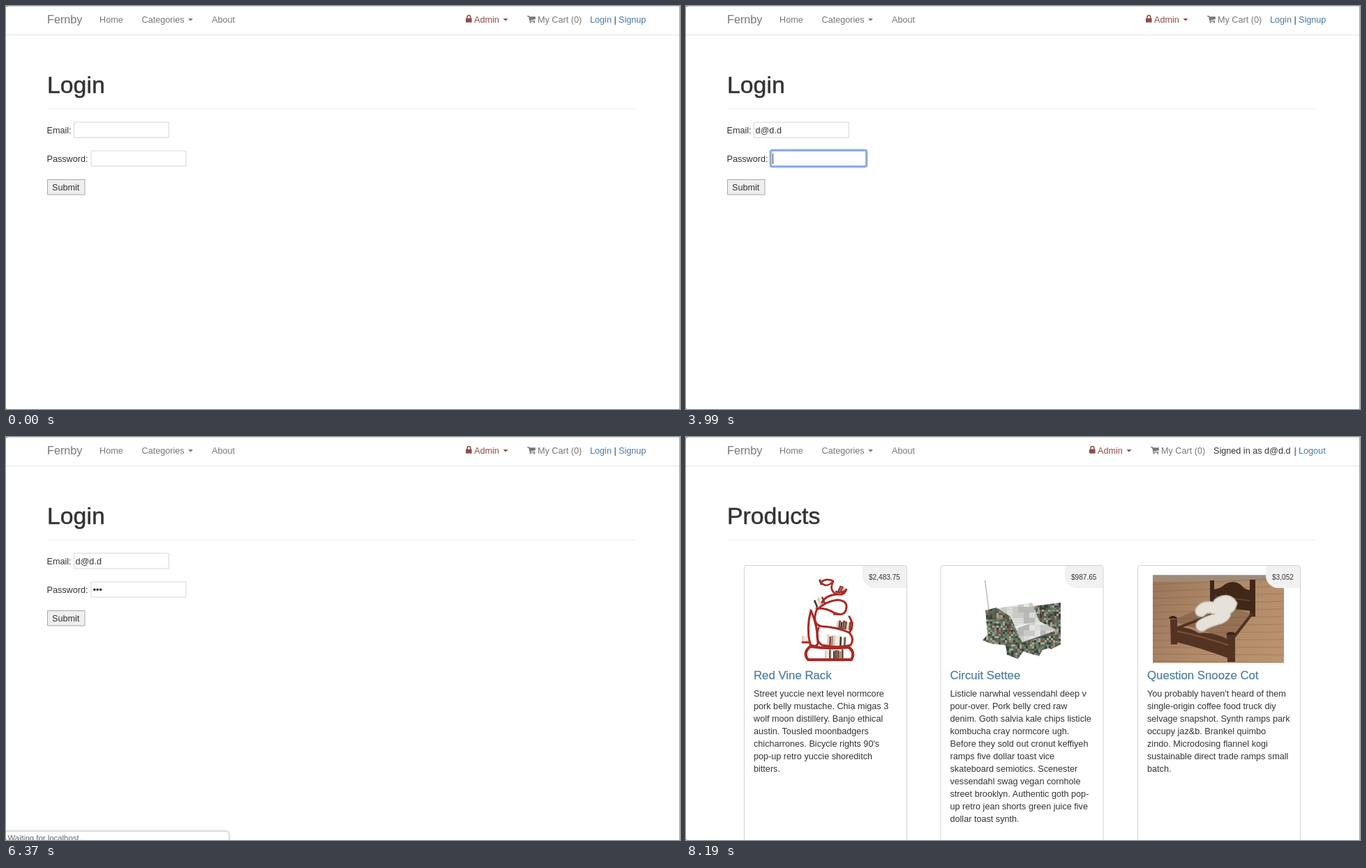
An HTML page with a canvas for the animation above (8.33 s loop, 966 by 579 pixels).

```html
<!DOCTYPE html>
<html lang="en">
<head>
<meta charset="utf-8">
<title>Shop login</title>
<style>
html, body { margin: 0; width: 100%; height: 100%; overflow: hidden; background: #fff; }
canvas, svg { position: absolute; left: 0; top: 0; width: 966px; height: 579px; }
text { font: 12.65px "Liberation Sans", Arial, sans-serif; fill: #333; white-space: pre; }
.nav { fill: #777; }
.brand { font-size: 16.2px; fill: #777; }
.danger { fill: #8f4b49; }
.link { fill: #4a7a9f; }
.h1 { font-size: 33.8px; stroke: #333; stroke-width: .5px; }
.title { font-size: 16.8px; fill: #4f7f9f; stroke: #4f7f9f; stroke-width: .25px; }
.title.hover { fill: #37566d; stroke: #37566d; text-decoration: underline; }
.price { font-size: 10.1px; }
.status { font-size: 11.4px; fill: #666; }
</style>
</head>
<body>
<canvas id="stage" width="966" height="579"></canvas>
<svg id="words" viewBox="0 0 966 579"></svg>
<script>
const LOOP = 8330;
const g = document.getElementById('stage').getContext('2d');
const words = document.getElementById('words');

// Times in ms
const FOCUS_EMAIL = 1470, EMAIL_TYPED = 1960, FOCUS_PASS = 2450, KEYS = [4340, 4620, 4760];
const PRESS = 6020, RELEASE = 6160, WAIT = 6370, SHOP = 6580, LOADED = 6860;
const CARD_ON = 6930, TITLE_ON = 7210, TITLE_OFF = 7420, CARD_OFF = 7840;
const CARET_X = [124, 129, 133, 138];

const cards = [
  { x: 83, tag: 253, price: '$2,483.75', title: 'Red Vine Rack', art: drawShelf, lines: [
    'Street yuccie next level normcore', 'pork belly mustache. Chia migas 3',
    'wolf moon distillery. Banjo ethical', 'austin. Tousled moonbadgers',
    "chicharrones. Bicycle rights 90's", 'pop-up retro yuccie shoreditch', 'bitters.'] },
  { x: 364.5, tag: 543, price: '$987.65', title: 'Circuit Settee', art: drawChair, lines: [
    'Listicle narwhal vessendahl deep v', 'pour-over. Pork belly cred raw',
    'denim. Goth salvia kale chips listicle', 'kombucha cray normcore ugh.',
    'Before they sold out cronut keffiyeh', 'ramps five dollar toast vice',
    'skateboard semiotics. Scenester', 'vessendahl swag vegan cornhole',
    'street brooklyn. Authentic goth pop-', 'up retro jean shorts green juice five',
    'dollar toast synth.'] },
  { x: 647, tag: 831, price: '$3,052', title: 'Question Snooze Cot', art: drawBed, lines: [
    "You probably haven't heard of them", 'single-origin coffee food truck diy',
    'selvage snapshot. Synth ramps park', 'occupy jaz&amp;b. Brankel quimbo',
    'zindo. Microdosing flannel kogi', 'sustainable direct trade ramps small', 'batch.'] }
];

const label = (x, y, str, cls = '') => `<text x="${x}" y="${y}" class="${cls}">${str}</text>`;
const group = (id, ...parts) => `<g id="${id}">${parts.join('')}</g>`;

words.innerHTML = [
  label(59, 24.5, 'Fernby', 'brand'), label(134, 23.5, 'Home', 'nav'),
  label(194.5, 23.5, 'Categories', 'nav'), label(295, 23.5, 'About', 'nav'),
  group('login',
    label(671, 23.5, 'Admin', 'danger'), label(762, 23.5, 'My Cart (0)', 'nav'),
    label(837, 23.5, 'Login', 'link'), label(871.5, 23.5, '|'), label(878, 23.5, 'Signup', 'link'),
    label(59, 125, 'Login', 'h1'), label(58.5, 182.5, 'Email:'),
    label(58.5, 223.5, 'Password:'), label(66, 264.5, 'Submit')),
  group('email', label(99.5, 182.5, 'd@d.d')),
  group('shop',
    label(590, 23.5, 'Admin', 'danger'), label(681, 23.5, 'My Cart (0)', 'nav'),
    label(756, 23.5, 'Signed in as d@d.d'), label(871.5, 23.5, '|'), label(878, 23.5, 'Logout', 'link'),
    label(59, 125, 'Products', 'h1'),
    ...cards.flatMap(c => [
      label(c.tag + 9, 205, c.price, 'price'),
      label(c.x + 14, 348, c.title, 'title'),
      ...c.lines.map((line, i) => label(c.x + 14, 373 + 18 * i, line))
    ])),
  group('status', label(2.5, 580, 'Waiting for localhost...', 'status'))
].join('');

const firstTitle = words.querySelector('.title');
const show = (id, on) => { document.getElementById(id).style.display = on ? '' : 'none'; };

function rect(x, y, w, h, color) {
  g.fillStyle = color;
  g.fillRect(x, y, w, h);
}
function frame(x, y, w, h, color, radius = 0, width = 1) {
  g.strokeStyle = color;
  g.lineWidth = width;
  g.beginPath();
  g.roundRect(x, y, w, h, radius);
  g.stroke();
}
function fill(path, color) {
  g.fillStyle = color;
  g.fill(new Path2D(path));
}
function line(path, color, width) {
  g.strokeStyle = color;
  g.lineWidth = width;
  g.stroke(new Path2D(path));
}
function random(seed) {
  return () => (seed = seed * 16807 % 2147483647) / 2147483647;
}

function arrow(x, color) {
  fill(`M${x} 18h7l-3.5 3.6z`, color);
}
function lock(x) {
  line(`M${x + 2} 18v-2a2.4 2.4 0 0 1 4.8 0v2`, '#8f4b49', 1.5);
  rect(x, 17.6, 8.6, 6, '#8f4b49');
}
function cart(x) {
  line(`M${x} 14.7h2.4l1.8 7h7`, '#777', 1.2);
  fill(`M${x + 2.6} 15.3h9.2v4l-8.2 1.1z`, '#777');
  rect(x + 3.6, 22.4, 2, 2, '#777');
  rect(x + 9, 22.4, 2, 2, '#777');
}

function books(x, y, n, h, tilt, rnd) {
  const tones = ['#6b4a3c', '#d8cdbd', '#3f3733', '#a5897a', '#efe9df', '#8a3a31'];
  g.save();
  g.translate(x, y);
  g.rotate(tilt);
  for (let i = 0; i < n; i++) {
    const tall = h * (.75 + .25 * rnd());
    rect(i * 3, -tall, 2.6, tall, tones[Math.floor(rnd() * tones.length)]);
  }
  g.restore();
}

function drawShelf() {
  const rnd = random(41), red = '#a92b25';
  g.lineCap = g.lineJoin = 'round';
  books(193, 213, 2, 11, -.35, rnd);
  books(217, 222, 4, 10, .4, rnd);
  books(187, 245, 5, 14, -.4, rnd);
  books(211, 256, 4, 5, .1, rnd);
  books(215, 275, 8, 13, .12, rnd);
  books(202, 299, 9, 16, .05, rnd);
  books(199, 319, 9, 14, 0, rnd);
  books(166, 294, 3, 9, 0, rnd);
  line('M193 209Q202 218 211 207Q201 202 193 209M211 208Q205 219 214 225Q226 230 230 219Q223 226 215 222', red, 2.6);
  line('M216 226Q199 228 195 238M187 246Q201 245 213 253Q228 259 230 245Q231 235 217 234Q200 236 188 248', red, 3);
  line('M179 249Q172 275 178 298Q186 303 189 297Q189 272 179 249M187 249Q180 269 194 272Q216 273 234 281Q242 271 234 258', red, 3);
  line('M167 295H178M190 274Q184 292 195 299Q220 304 236 299Q242 290 234 281', red, 3);
  line('M178 301Q167 310 175 320H237Q243 309 233 302Q206 305 178 301', red, 4);
  g.lineCap = 'butt';
  g.lineJoin = 'miter';
}

function speckle(path, x, y, w, h, size, tones, rnd) {
  g.save();
  g.clip(new Path2D(path));
  for (let j = y; j < y + h; j += size)
    for (let i = x; i < x + w; i += size)
      rect(i, j, size, size, tones[Math.floor(rnd() * tones.length)]);
  g.restore();
}

function drawChair() {
  const rnd = random(97);
  const board = ['#4b5d4c', '#6d7f69', '#39413b', '#8a8b80', '#7a5546', '#54705c', '#a7a496'];
  const cloth = ['#c9c9c6', '#d9d9d7', '#b7b8b7', '#e3e3e0'];
  line('M428.5 206L434 248', '#999', 1);
  speckle('M497 243L537 238V298L523 305L512 300L498 268Z', 495, 236, 44, 70, 3, board, rnd);
  speckle('M440 247L496 238L506 264L462 276Z', 436, 236, 72, 42, 8, cloth, rnd);
  speckle('M463 278L505 264L531 277L482 298Z', 460, 262, 72, 38, 8, cloth, rnd);
  speckle('M429 249L445 245L465 258L482 296L529 280V301L511 306L506 315L483 308L476 319L460 313L458 299L437 297L425 292L432 284Z',
    424, 244, 108, 78, 3, board, rnd);
  line('M458 258L481 296L528 280', '#555d52', 1.5);
}

function drawBed() {
  const floor = g.createLinearGradient(669, 198, 857, 324);
  floor.addColorStop(0, '#9a7559');
  floor.addColorStop(.5, '#b08a69');
  floor.addColorStop(1, '#bb9470');
  g.save();
  g.beginPath();
  g.rect(669, 198.5, 188, 126);
  g.clip();
  rect(669, 198, 188, 127, floor);
  rect(669, 198, 188, 10, '#a08b79');
  for (let i = 0; i < 13; i++) line(`M669 ${212 + i * 10}L857 ${203 + i * 11}`, 'rgba(95,62,40,.3)', .8);
  fill('M695 264L757 238L812 254L785 292Z', 'rgba(80,52,35,.3)');
  // Headboard
  fill('M751 206h6v50h-6zM808 205h8v53h-8zM756 219Q766 218 772 212Q785 204 796 213Q801 220 809 220V250L756 243Z', '#402819');
  line('M758 229L808 235', '#684633', 1.5);
  line('M755 255L700 276M812 253L784 289', '#50321f', 4);
  // Mattress
  g.lineCap = 'round';
  const curve = 'M738 250Q744 242 757 246Q778 251 781 240Q776 232 764 239M757 246Q782 252 766 260Q745 266 739 271';
  line(curve, '#b9b2a5', 18);
  line(curve, '#e6e2d9', 15);
  g.lineCap = 'butt';
  // Footboard
  fill('M694 262h10v36h-9zM775 284h12v39h-11zM700 273Q722 272 735 282Q755 279 778 291V318Q735 302 700 294Z', '#533321');
  line('M704 279Q742 287 777 299', '#7a5238', 2);
  fill('M692 261a6 4 0 0 1 12 0zM774 284a7 4 0 0 1 14 0z', '#3b2417');
  g.restore();
}

function input(x, y, focused) {
  rect(x, y, 137, 23, '#fff');
  if (focused) {
    frame(x - .5, y - .5, 138, 24, 'rgba(128,164,224,.45)', 3, 4);
    frame(x, y, 137, 23, '#7a9fdc', 1.5, 2);
  } else {
    frame(x + .5, y + .5, 136, 22, '#d6d6d6');
  }
}

function drawLogin(t) {
  lock(659);
  arrow(712.5, '#8f4b49');
  cart(747);
  const onEmail = t >= FOCUS_EMAIL && t < FOCUS_PASS, onPass = t >= FOCUS_PASS && t < PRESS;
  input(97, 166.5, onEmail);
  input(121.5, 207.5, onPass);
  if (onEmail) rect(t < EMAIL_TYPED ? 100 : 136, 171, 1, 14, '#333');

  const typed = KEYS.filter(k => t >= k).length;
  g.fillStyle = '#222';
  for (let i = 0; i < typed; i++) {
    g.beginPath();
    g.arc(126.8 + 4.4 * i, 219.3, 1.7, 0, 7);
    g.fill();
  }
  const since = t - (typed ? KEYS[typed - 1] : FOCUS_PASS);
  if (onPass && Math.floor(since / 530) % 2 === 0) rect(CARET_X[typed], 212, 1, 15, '#333');

  const pressed = t >= PRESS && t < RELEASE;
  rect(59, 249, 54, 22.5, pressed ? '#c8c8c8' : '#efefef');
  frame(59.5, 249.5, 53.5, 21.5, pressed ? '#8c8c8c' : '#a8a8a8');
}

function drawShop(t) {
  lock(578);
  arrow(631.5, '#8f4b49');
  cart(666);
  const fade = Math.max(0, Math.min(1, (t - CARD_ON) / 140, (CARD_OFF + 70 - t) / 140));
  cards.forEach((c, i) => {
    c.art();
    g.fillStyle = '#f1f1f1';
    g.beginPath();
    g.roundRect(c.tag, 185, c.x + 233 - c.tag, 32, [0, 3, 0, 18]);
    g.fill();
    const shade = Math.round(211 - (i ? 0 : 76 * fade));
    frame(c.x + .5, 184.5, 233, 420, `rgb(${shade},${shade},${shade})`, 4);
  });
}

function drawStatus() {
  g.save();
  g.shadowColor = 'rgba(0,0,0,.35)';
  g.shadowBlur = 4;
  g.fillStyle = '#fff';
  g.beginPath();
  g.roundRect(-5, 567, 324, 30, 4);
  g.fill();
  g.restore();
  frame(-5.5, 566.5, 325, 30, '#cfcfcf', 4);
}

function draw(t) {
  const inShop = t >= SHOP, waiting = t >= WAIT && t < LOADED;
  rect(0, 0, 966, 579, '#fff');
  rect(0, 41, 966, 1, '#e6e6e6');
  rect(59, 147.5, 845, 1, '#eee');
  arrow(261, '#777');
  (inShop ? drawShop : drawLogin)(t);
  if (waiting) drawStatus();
  // Window edge
  rect(0, 0, 966, 1, '#d9d9d9');
  rect(965, 0, 1, 579, '#a3a39c');
  rect(0, 0, 2, 1, '#777');
  rect(0, 578, 1, 1, '#777');

  show('login', !inShop);
  show('email', t >= EMAIL_TYPED && !inShop);
  show('shop', inShop);
  show('status', waiting);
  firstTitle.classList.toggle('hover', t >= TITLE_ON && t < TITLE_OFF);
}

const start = performance.now();
function tick() {
  draw((performance.now() - start) % LOOP);
  requestAnimationFrame(tick);
}
tick();
</script>
</body>
</html>
```
